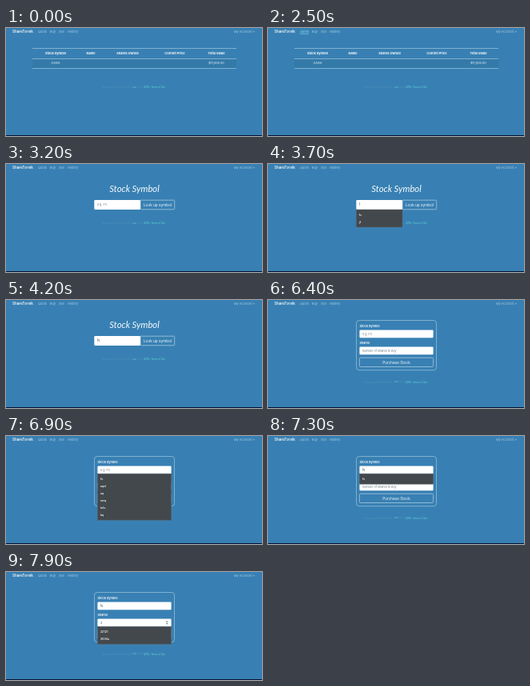
Animation of 320x135 px, one loop 8000 ms. Source, as an HTML page with a canvas:

```html
<!DOCTYPE html>
<html lang="en">
<head>
<meta charset="utf-8">
<title>Trading app</title>
<style>
html, body { margin: 0; width: 100%; height: 100%; overflow: hidden; background: #3880b3; }
canvas { display: block; width: 320px; height: 135px; }
</style>
</head>
<body>
<canvas id="stage"></canvas>
<script>
const W = 320, H = 135, LOOP = 8000;
const BLUE = '#3880b3', WHITE = '#f6fafc', PALE = '#a5cbe0', TEAL = '#62d5d3', DARK = '#43484c', HINT = '#727e86';
const FONT = 'Inter, "Open Sans", sans-serif';
const TITLE_FONT = 'Lato, "Open Sans", sans-serif';
const canvas = document.getElementById('stage');
const ctx = canvas.getContext('2d');
const dpr = window.devicePixelRatio || 1;
canvas.width = W * dpr;
canvas.height = H * dpr;

const clamp = v => Math.max(0, Math.min(1, v));

function text(s, x, y, size, color = WHITE, style = '400', align = 'left', font = FONT) {
  ctx.font = `${style} ${size}px ${font}`;
  ctx.fillStyle = color;
  ctx.textAlign = align;
  ctx.textBaseline = 'alphabetic';
  ctx.fillText(s, x, y + size * 0.36);
  return ctx.measureText(s).width;
}

function box(x, y, w, h, r, fill, stroke, line = 0.7) {
  ctx.beginPath();
  ctx.roundRect(x, y, w, h, r);
  if (fill) { ctx.fillStyle = fill; ctx.fill(); }
  if (stroke) { ctx.strokeStyle = stroke; ctx.lineWidth = line; ctx.stroke(); }
}

function rule(x, y, w, color, h = 1) {
  ctx.fillStyle = color;
  ctx.fillRect(x, y, w, h);
}

function nav(active) {
  text('ShareTorvik', 8, 4.3, 4.5, WHITE, '600');
  [['Quote', 40], ['Buy', 55], ['Sell', 66], ['History', 77]].forEach(([label, x]) => {
    const on = label === active;
    const w = text(label, x, 4.9, 3.9, on ? '#8de6ea' : PALE);
    if (on) rule(x, 7.2, w, '#8de6ea', 0.5);
  });
  text('My Account', 285, 4.9, 3.9, PALE);
  ctx.fillStyle = PALE;
  ctx.beginPath();
  ctx.moveTo(308.6, 4.2);
  ctx.lineTo(311, 4.2);
  ctx.lineTo(309.8, 5.5);
  ctx.fill();
}

function footer(y) {
  const faint = '#508fbc';
  text('Data provided for free by', 120, y, 3, faint);
  text('QVN', 157.5, y, 2.6, TEAL);
  text('View', 164.5, y, 2.6, faint);
  text("QVN's Terms of Use.", 172, y, 2.8, TEAL);
}

function input(x, y, w, h, value, hint) {
  box(x, y, w, h, 1.2, '#ffffff');
  text(value || hint, x + 3.6, y + h / 2, 3.7, value ? '#3c464e' : HINT);
}

function list(x, y, w, items) {
  const h = items.length * 9 + 4;
  box(x, y, w, h, 0, DARK, '#5d676e', 0.5);
  items.forEach((s, i) => text(s, x + 3.5, y + 6.3 + i * 9, 3.5, '#f2f2f2', '600'));
}

function portfolio() {
  const cols = [62, 106, 152, 211, 263];
  ctx.fillStyle = '#347aa9';
  ctx.fillRect(33, 38, 255, 12);
  [25, 38, 50].forEach(y => rule(33, y, 255, '#7fb0cf'));
  ['Stock Symbol', 'Name', 'Shares Owned', 'Current Price', 'Total Value']
    .forEach((s, i) => text(s, cols[i], 31.4, 3.9, WHITE, '700', 'center'));
  text('CASH', cols[0], 44, 3.9, WHITE, '400', 'center');
  text('$11,000.00', cols[4], 44, 3.8, WHITE, '400', 'center');
  footer(74);
}

const symbols = ['fv', 'aqvl', 'aq', 'mvq', 'tolu', 'bq'];
const matches = ['fv', 'jf'];

function quote(t) {
  text('Stock Symbol', 160.5, 31.4, 11.3, WHITE, 'italic 400', 'center', TITLE_FONT);
  footer(74);
  const value = t < 3700 ? '' : t < 3900 ? 'f' : 'fv';
  const hover = clamp((t - 4200) / 200);
  box(168, 45.2, 42.7, 11.6, 1.2, `rgba(246,250,252,${hover})`, '#b4d2e3');
  const c = (a, b) => Math.round(a + (b - a) * hover);
  text('Look up symbol', 189.5, 51, 4.7, `rgb(${c(246, 56)},${c(250, 128)},${c(252, 179)})`, '400', 'center');
  input(110.3, 45, 57.7, 12, value, 'e.g. FV');
  if (t >= 3600 && t < 4000) list(110.3, 57, 57.7, t < 3700 ? symbols : t < 3900 ? matches : ['fv']);
}

function pair(label, value, x) {
  const w = text(label + ' ', x, 28.3, 3.9, WHITE, '700');
  text(value, x + w, 28.3, 3.9);
}

function result() {
  pair('Name:', 'Fovadorn, Inc.', 53);
  pair('Price:', '$240.93', 147);
  pair('Symbol:', 'FV', 237);
  footer(45);
}

function buy(t) {
  footer(102.5);
  box(110.5, 25.5, 100, 62.2, 3.5, null, '#9cc3da');
  text('Stock Symbol', 114.4, 32.6, 3.8, WHITE, '600');
  text('Shares', 114.4, 54, 3.8, WHITE, '600');
  const symbol = t < 7000 ? '' : t < 7100 ? 'f' : 'fv';
  const shares = t >= 7900 ? '2' : '';
  input(114.4, 37.5, 92.2, 9.7, symbol, 'e.g. FV');
  input(114.4, 58.5, 92.2, 9.7, shares, 'number of shares to buy');
  box(114.4, 72.2, 92.2, 11.3, 1.2, null, '#b4d2e3');
  text('Purchase Stock', 160.5, 77.9, 4.7, WHITE, '400', 'center');
  if (t >= 6900 && t < 7400) list(114.4, 47.2, 92.2, t < 7000 ? symbols : t < 7300 ? matches : ['fv']);
  if (t >= 7600) {
    list(114.4, 68.2, 92.2, ['22121', '2000a']);
    ctx.fillStyle = '#59636b';
    [-1, 1].forEach(d => {
      ctx.beginPath();
      ctx.moveTo(200, 63.3 + d * 0.6);
      ctx.lineTo(202.4, 63.3 + d * 0.6);
      ctx.lineTo(201.2, 63.3 + d * 2.2);
      ctx.fill();
    });
  }
}

function draw(t) {
  ctx.setTransform(dpr, 0, 0, dpr, 0, 0);
  ctx.fillStyle = BLUE;
  ctx.fillRect(0, 0, W, H);
  nav(t >= 2500 && t < 2800 ? 'Quote' : t >= 5800 && t < 6200 ? 'Buy' : '');
  if (t < 2800) portfolio();
  else if (t < 4800) quote(t);
  else if (t < 6200) result();
  else buy(t);
  rule(0, 134, W, '#04102a');
}

const start = performance.now();
function tick() {
  draw((performance.now() - start) % LOOP);
  requestAnimationFrame(tick);
}
draw(0);
requestAnimationFrame(tick);
</script>
</body>
</html>
```
